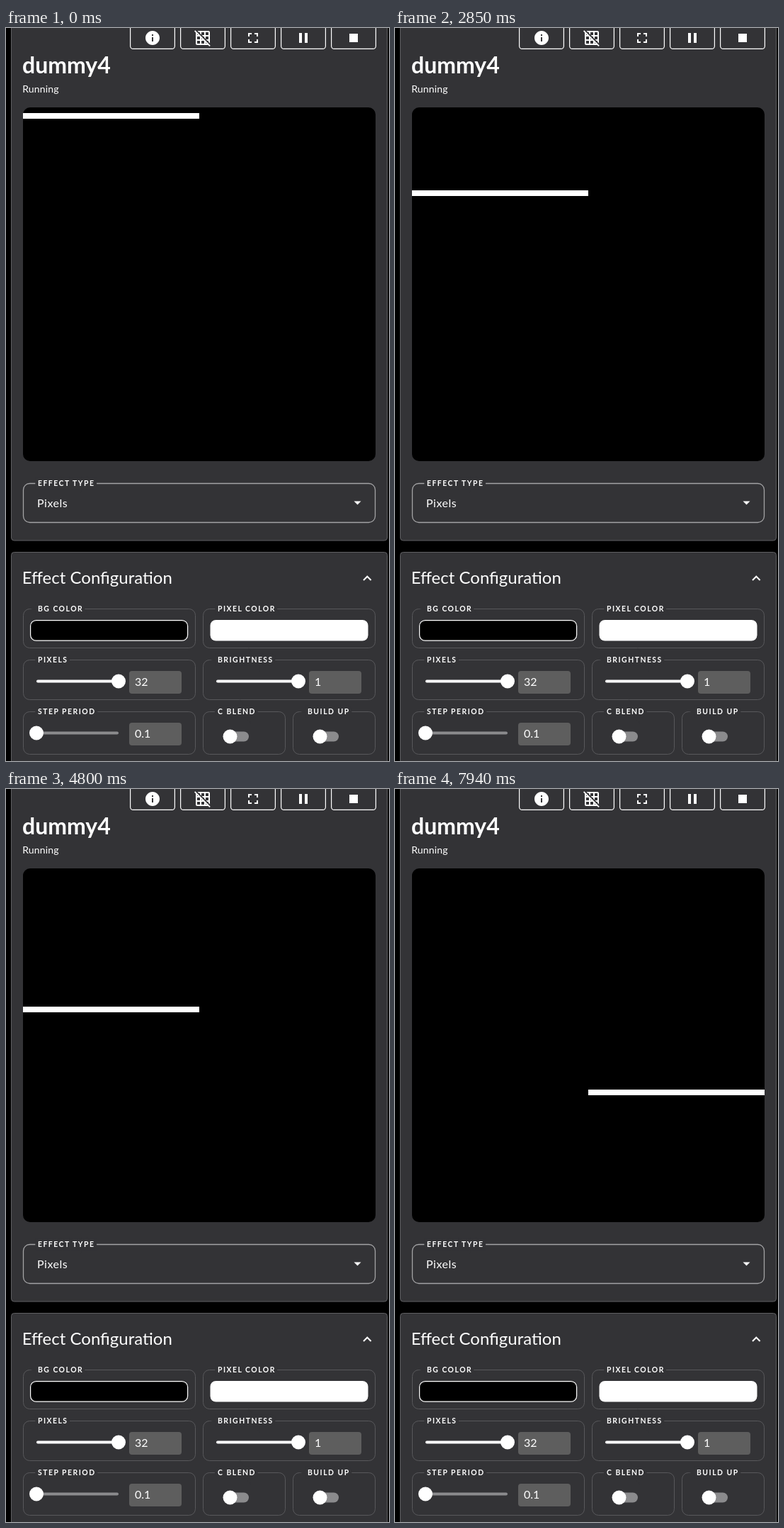
An HTML page that plays this animation: 541x1034 px, repeating every 8000 ms.

```html
<!DOCTYPE html>
<html lang="en">
<head>
<meta charset="utf-8">
<title>Effect preview</title>
<style>
  html, body { margin: 0; width: 100%; height: 100%; overflow: hidden; background: #000; }
  svg { display: block; }
  text { font: 16px Lato, "Open Sans", sans-serif; fill: #fff; }
  .name { font-size: 32px; font-weight: 700; }
  .status { font-size: 14px; letter-spacing: .15px; }
  .heading { font-size: 24px; }
  .choice { letter-spacing: .5px; }
  .label { font-size: 10.4px; font-weight: 700; letter-spacing: 1.5px;
           paint-order: stroke; stroke: #333336; stroke-width: 9px; }
  .card { fill: #333336; stroke: #5f5f62; }
  .field { fill: none; stroke: #58585b; }
  .select { stroke: #a3a3a5; stroke-width: 1.3; }
  .button { fill: none; stroke: #fff; stroke-width: 1.2; }
  .value { fill: #5e5e5e; }
  .rail { fill: #8b8b8d; }
  .white { fill: #fff; }
</style>
</head>
<body>
<svg id="stage" width="541" height="1034" viewBox="0 0 541 1034"></svg>
<script>
const rect = (x, y, w, h, r, cls) =>
  `<rect x="${x}" y="${y}" width="${w}" height="${h}" rx="${r}" class="${cls}"/>`;
const text = (x, y, cls, str) => `<text x="${x}" y="${y}" class="${cls}">${str}</text>`;
const knob = (x, y) => `<circle cx="${x}" cy="${y}" r="10" class="white"/>`;

const field = (x, y, w, h, label, cls = '') =>
  rect(x, y, w, h, 9, 'field ' + cls) + text(x + 20.5, y + 3.7, 'label', label);

const slider = (x, y, label, value, full) =>
  field(x, y, 243, full ? 56 : 60, label) +
  rect(x + 18.5, y + 28, 116, 4, 2, full ? 'white' : 'rail') +
  knob(x + (full ? 134.5 : 18.5), y + 30) +
  rect(x + 149.5, y + 15.5, 74, 32, 4, 'value') +
  text(x + 157.5, y + 36.5, '', value);

const toggle = (x, label) =>
  field(x, 964.5, 116, 60, label) + rect(x + 30.5, 992.5, 34, 14, 7, 'rail') + knob(x + 38, 999.5);

const icons = [
  'M12 2C6.48 2 2 6.48 2 12s4.48 10 10 10 10-4.48 10-10S17.52 2 12 2zm1 15h-2v-6h2v6zm0-8h-2V7h2v2z',
  'M8 4v1.45l2 2V4h4v4h-3.45l2 2H14v1.45l2 2V10h4v4h-3.45l2 2H20v1.45l2 2V4c0-1.1-.9-2-2-2H4.55l2 2H8z' +
    'm8 0h4v4h-4V4zM1.27 1.27 0 2.55l2 2V20c0 1.1.9 2 2 2h15.46l2 2 1.27-1.27L1.27 1.27z' +
    'M10 12.55 11.45 14H10v-1.45zm-6-6L5.45 8H4V6.55zM8 20H4v-4h4v4zm0-6H4v-4h3.45l.55.55V14z' +
    'm6 6h-4v-4h3.45l.55.54V20zm2 0v-1.46L17.46 20H16z',
  'M7 14H5v5h5v-2H7v-3zm-2-4h2V7h3V5H5v5zm12 7h-3v2h5v-5h-2v3zM14 5v2h3v3h2V5h-5z',
  'M6 19h4V5H6v14zm8-14v14h4V5h-4z',
  'M6 6h12v12H6z'
];
const buttons = icons.map((d, i) =>
  rect(175.6 + 71 * i, -10, 62.8, 39.4, 4, 'button') +
  `<path class="white" transform="translate(${195 + 71 * i} 2)" d="${d}"/>`).join('');

document.getElementById('stage').innerHTML =
  rect(7.5, -20, 531, 743, 4, 'card') + buttons +
  text(23, 64, 'name', 'dummy4') +
  text(23.2, 91, 'status', 'Running') +
  rect(24, 112, 498, 499, 10, '') +
  '<rect id="bar" width="249" class="white"/>' +
  field(24.5, 642.5, 497, 55, 'EFFECT TYPE', 'select') +
  text(44, 676, 'choice', 'Pixels') +
  '<path class="white" d="M491.5 667.5h10l-5 5z"/>' +
  rect(7.5, 739.5, 531, 320, 4, 'card') +
  text(22.7, 784, 'heading', 'Effect Configuration') +
  '<path d="M505 779l5.3-5.3 5.3 5.3" fill="none" stroke="#fff" stroke-width="2"/>' +
  field(24.5, 819.5, 243, 55, 'BG COLOR') +
  rect(34.6, 835.6, 222, 28.6, 8, 'button" style="fill:#000') +
  field(278.5, 819.5, 243, 55, 'PIXEL COLOR') +
  rect(288.5, 835, 223, 29.5, 8, 'white') +
  slider(24.5, 891.5, 'PIXELS', '32', true) +
  slider(278.5, 891.5, 'BRIGHTNESS', '1', true) +
  slider(24.5, 964.5, 'STEP PERIOD', '0.1', false) +
  toggle(278.5, 'C BLEND') + toggle(405.5, 'BUILD UP');

// Runs of steps: start, count, first gap; gaps alternate so that each pair lasts 200 ms.
const LOOP = 8000;
const runs = [
  [130, 7, 70], [790, 1], [920, 7, 70], [1580, 1], [1720, 9, 70], [2650, 10, 70],
  [3590, 1], [3720, 1], [3860, 1], [3920, 9, 130], [4800, 1], [4920, 4, 70],
  [5330, 10, 70], [6270, 1], [6470, 6, 70], [7000, 1], [7140, 9, 60]
];
const steps = runs.flatMap(([start, count, gap = 0]) =>
  Array.from({ length: count }, (_, i) => start + (i >> 1) * 200 + (i % 2) * gap));

// Each step lights the next half row of a 64-row matrix.
const bar = document.getElementById('bar');
const rowY = row => Math.round(112.5 + row * 498 / 64);

function draw(now) {
  const t = now % LOOP;
  const half = 2 + steps.filter(s => s <= t).length;
  const row = half >> 1;
  bar.setAttribute('x', half % 2 ? 273 : 24);
  bar.setAttribute('y', rowY(row));
  bar.setAttribute('height', rowY(row + 1) - rowY(row));
}

const begin = performance.now();
function tick() {
  draw(performance.now() - begin);
  requestAnimationFrame(tick);
}
tick();
</script>
</body>
</html>
```
